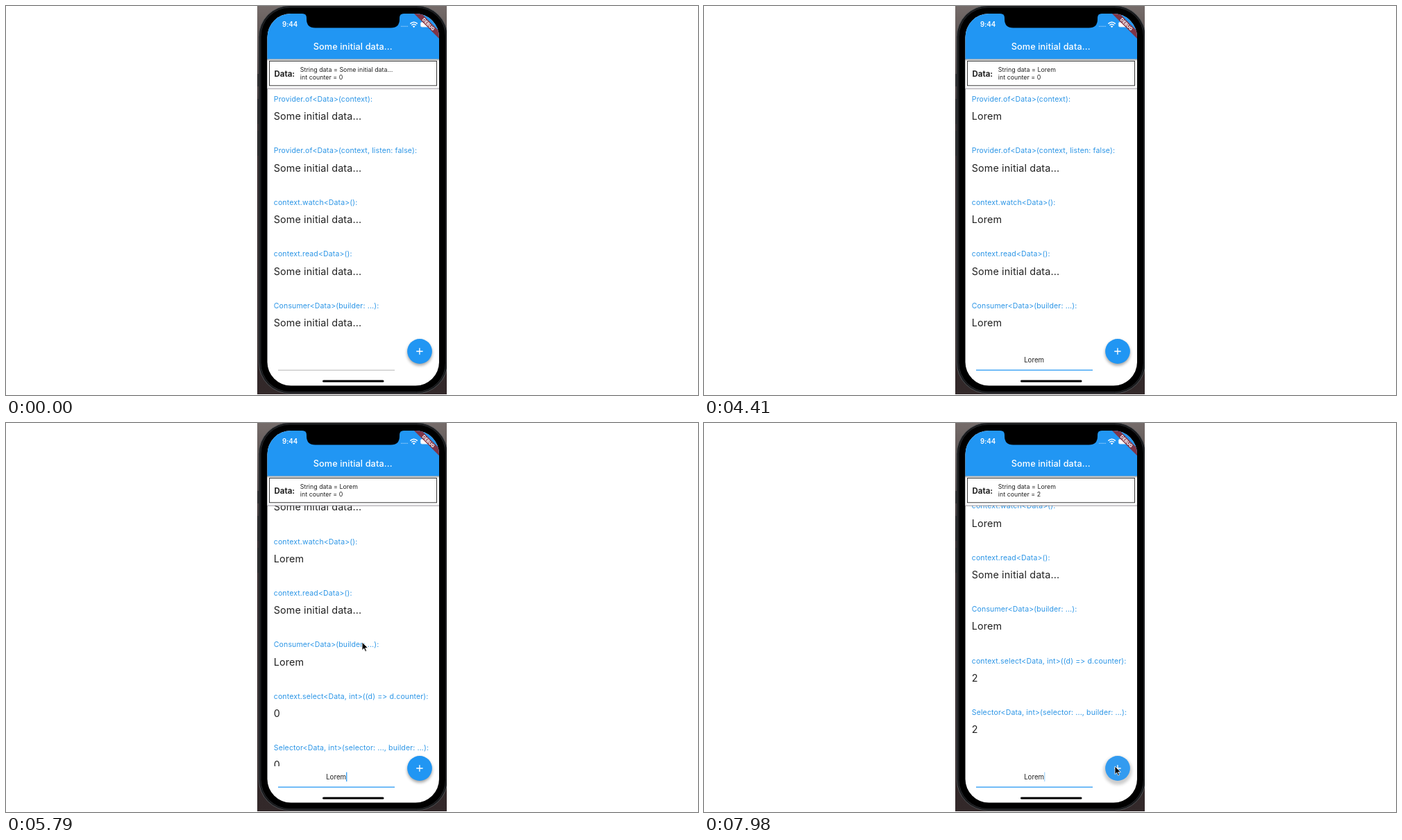
Animation, 997 px wide and 561 px high, one loop 8000 ms. Source, as an HTML page:

```html
<!DOCTYPE html>
<html lang="en">
<head>
<meta charset="utf-8">
<title>Provider demo</title>
<style>
  html, body { margin: 0; width: 100%; height: 100%; overflow: hidden; background: #fff; }
  svg { display: block; width: 100vw; height: 100vh; }
  text { font-family: Inter, Roboto, sans-serif; font-feature-settings: "calt" 0; fill: #212121; white-space: pre; }
  .label { font-size: 10.5px; letter-spacing: .14px; fill: #2b95e6; }
  .value { font-size: 14.3px; letter-spacing: .14px; }
  .small { font-size: 8.8px; letter-spacing: .04px; }
  .title { font-size: 12.7px; letter-spacing: .13px; font-weight: 500; fill: #fff; }
</style>
</head>
<body>
<svg viewBox="0 0 997 561" preserveAspectRatio="xMidYMid meet">
  <defs>
    <clipPath id="phone"><rect x="362" width="273" height="560"/></clipPath>
    <clipPath id="screen"><rect x="376.5" y="11" width="247.5" height="536.5" rx="34"/></clipPath>
    <clipPath id="listArea"><rect x="376" y="119" width="248" height="376"/></clipPath>
    <linearGradient id="wall" x2="0" y2="1">
      <stop stop-color="#756c6a"/><stop offset=".3" stop-color="#2a1e20"/><stop offset="1" stop-color="#33292a"/>
    </linearGradient>
    <linearGradient id="shade" x2="0" y2="1">
      <stop stop-color="#000" stop-opacity=".38"/><stop offset="1" stop-color="#000" stop-opacity="0"/>
    </linearGradient>
    <filter id="blur" x="-50%" y="-50%" width="200%" height="200%"><feGaussianBlur stdDeviation="2.2"/></filter>
  </defs>
  <rect width="997" height="561" fill="#fff"/>

  <g clip-path="url(#phone)">
    <rect x="362" width="273" height="560" fill="url(#wall)"/>
    <g fill="#17181a">
      <rect x="362.5" y="98" width="3" height="18"/>
      <rect x="362.5" y="134" width="3" height="36"/>
      <rect x="362.5" y="180" width="3" height="36"/>
    </g>
    <rect x="364.2" y="-.5" width="272" height="559.5" rx="45" fill="#17181a" stroke="#55585c" stroke-width=".9"/>
    <rect x="367" y="2" width="266.5" height="554.5" rx="42" fill="#000" stroke="#2c2e31" stroke-width=".8"/>
  </g>

  <g clip-path="url(#screen)">
    <rect x="376" y="11" width="248" height="537" fill="#fff"/>
    <g clip-path="url(#listArea)"><g id="list"></g></g>

    <rect x="376" y="77" width="248" height="42" fill="#fff"/>
    <rect x="376" y="118.3" width="248" height="1.2" fill="#b9b6bd"/>
    <rect x="376" y="119.5" width="248" height="2" fill="url(#shade)" opacity=".35"/>
    <rect x="376" y="11" width="248" height="65.5" fill="#2196f3"/>
    <rect x="376" y="76.5" width="248" height="3" fill="url(#shade)"/>
    <rect x="379.5" y="79.5" width="241" height="35.3" fill="#fff" stroke="#3a3a3a"/>
    <text x="386.6" y="101.6" font-size="11.4" font-weight="700">Data:</text>
    <text id="dataLine" class="small" x="423.8" y="95.1"></text>
    <text id="counterLine" class="small" x="423.8" y="105.8"></text>
    <text class="title" x="499.7" y="63" text-anchor="middle">Some initial data...</text>

    <text x="398" y="30.3" font-size="9.7" font-weight="600" style="fill:#fff">9:44</text>
    <path d="M569 29.3h10" stroke="#fff" stroke-opacity=".5" stroke-width="1.3" stroke-dasharray="1.3 .9"/>
    <path d="M582.4 25.6q5.2-4.8 10.4 0M584.3 27.8q3.3-3 6.6 0" fill="none" stroke="#fff" stroke-width="1.5"/>
    <path d="M585.7 29.2q1.9-1.6 3.8 0l-1.9 2z" fill="#fff"/>
    <rect x="597.3" y="23.2" width="14" height="7" rx="2" fill="#fff" stroke="#b7dcfb" stroke-width=".6"/>
    <g transform="translate(624 11) rotate(45)">
      <rect x="-30" y="17.8" width="60" height="7.7" fill="#84303f" opacity=".95"/>
      <text y="24" text-anchor="middle" font-size="6.4" font-weight="800" style="fill:#fff">DEBUG</text>
    </g>

    <path id="underline" d="M392 525.2H560"/>
    <text id="field" x="475.6" y="513.8" font-size="9.7" text-anchor="middle"></text>
    <rect id="caret" y="503.6" width="1.3" height="13.4" fill="#2196f3"/>
    <circle id="halo" cx="596" cy="500.5" r="18" filter="url(#blur)"/>
    <circle id="button" cx="596" cy="498" r="17.9"/>
    <path d="M591.2 498h9.4M595.9 493.3v9.4" stroke="#fff" stroke-width="1.35"/>
    <rect x="456" y="539.6" width="88.5" height="3" rx="1.5" fill="#000"/>
  </g>
  <path d="M427 10H573V11Q567 11 567 17V19Q567 31.5 554.5 31.5H445.5Q433 31.5 433 19V17Q433 11 427 11Z" fill="#000"/>
  <path id="mouse" d="M0 0V11.6L2.7 9.1L4.6 13.4L6.5 12.6L4.6 8.4H8.3Z" fill="#000" stroke="#fff" stroke-width=".8"/>
</svg>
<script>
const LOOP = 8000, ROW = 74.4, MAX_SCROLL = 163.4;
const INITIAL = 'Some initial data...';
const FOCUS = 1590;
const TYPED = [[2460, 'L'], [2790, 'Lo'], [3090, 'Lor'], [3360, 'Lore'], [3630, 'Lorem']];
const PRESSES = [7230, 7800];
const SCROLL = [[5290, 0], [5550, 55.8], [5790, 112]];
const MOUSE = [
  [1050, 522, 560], [1230, 512, 532], [1410, 501, 510], [1560, 497, 503],
  [4710, 497, 503], [4890, 498, 474], [5100, 498, 435], [5250, 498, 426],
  [5550, 503, 369], [5790, 513, 316], [5910, 520, 322], [6240, 550, 402],
  [6540, 577, 468], [6840, 589, 490], [7080, 592, 495]
];
// [title, shows typed text, shows counter]
const ROWS = [
  ['Provider.of<Data>(context):', 1],
  ['Provider.of<Data>(context, listen: false):'],
  ['context.watch<Data>():', 1],
  ['context.read<Data>():'],
  ['Consumer<Data>(builder: ...):', 1],
  ['context.select<Data, int>((d) => d.counter):', 0, 1],
  ['Selector<Data, int>(selector: ..., builder: ...):', 0, 1]
];

const $ = id => document.getElementById(id);
const clamp = x => Math.max(0, Math.min(1, x));
const setText = (el, s) => { if (el.textContent !== s) el.textContent = s; };
const attrs = (el, map) => { for (const k in map) el.setAttribute(k, map[k]); };

function addText(cls, y, s) {
  const el = document.createElementNS('http://www.w3.org/2000/svg', 'text');
  attrs(el, { class: cls, x: 385.8, y });
  el.textContent = s;
  return $('list').appendChild(el);
}
const values = ROWS.map(([title], i) => {
  addText('label', 138 + i * ROW, title);
  return addText('value', 164.3 + i * ROW, INITIAL);
});

function track(keys, t, column) {
  const i = keys.findIndex(k => k[0] > t);
  if (i === 0) return keys[0][column];
  if (i < 0) return keys[keys.length - 1][column];
  const a = keys[i - 1], b = keys[i];
  return a[column] + (b[column] - a[column]) * (t - a[0]) / (b[0] - a[0]);
}

function scrollAt(t) {
  if (t <= 5790) return track(SCROLL, t, 1);
  return MAX_SCROLL - (MAX_SCROLL - 112) * Math.exp((5790 - t) / 182);
}

function caretAt(t) {
  if (t < FOCUS) return 0;
  const fadeOut = d => Math.pow(1 - clamp(d / 250), 4);
  if (t < 2460) return t < 2130 ? clamp((t - FOCUS) / 100) : fadeOut(t - 2130);
  if (t < 4050) return 1;
  const phase = (t - 4050) % 970;
  return phase < 660 ? fadeOut(phase) : clamp((phase - 660) / 120);
}

function pressAt(t) {
  return Math.max(...PRESSES.map(p => {
    const d = t - p;
    return d < 0 ? clamp(1 + d / 90) : 1 - clamp((d - 140) / 200);
  }));
}

function render(t) {
  const typed = TYPED.filter(k => k[0] <= t).map(k => k[1]).pop() || '';
  const data = typed || INITIAL;
  const count = String(PRESSES.filter(p => p <= t).length);
  setText($('dataLine'), 'String data = ' + data);
  setText($('counterLine'), 'int counter = ' + count);
  ROWS.forEach(([, live, counter], i) => setText(values[i], counter ? count : live ? data : INITIAL));
  $('list').setAttribute('transform', `translate(0 ${-scrollAt(t)})`);

  setText($('field'), typed);
  const width = typed ? $('field').getComputedTextLength() : 0;
  attrs($('caret'), { x: 475.6 + width / 2, opacity: caretAt(t) });
  const focused = t >= FOCUS;
  attrs($('underline'), { stroke: focused ? '#2196f3' : '#a3a3a3', 'stroke-width': focused ? 1.3 : .8 });

  const press = pressAt(t);
  attrs($('halo'), { r: 18 + 3 * press, cy: 500.5 + press, opacity: .36 - .2 * press });
  $('button').setAttribute('fill', `rgb(${33 + 22 * press},${150 + 6 * press},${243 - 4 * press})`);

  const shown = t >= 1050 && t < 2460 || t >= 4710;
  attrs($('mouse'), {
    transform: `translate(${track(MOUSE, t, 1)} ${track(MOUSE, t, 2)})`,
    visibility: shown ? 'visible' : 'hidden'
  });
}

const start = performance.now();
function tick() {
  render((performance.now() - start) % LOOP);
  requestAnimationFrame(tick);
}
tick();
</script>
</body>
</html>
```
